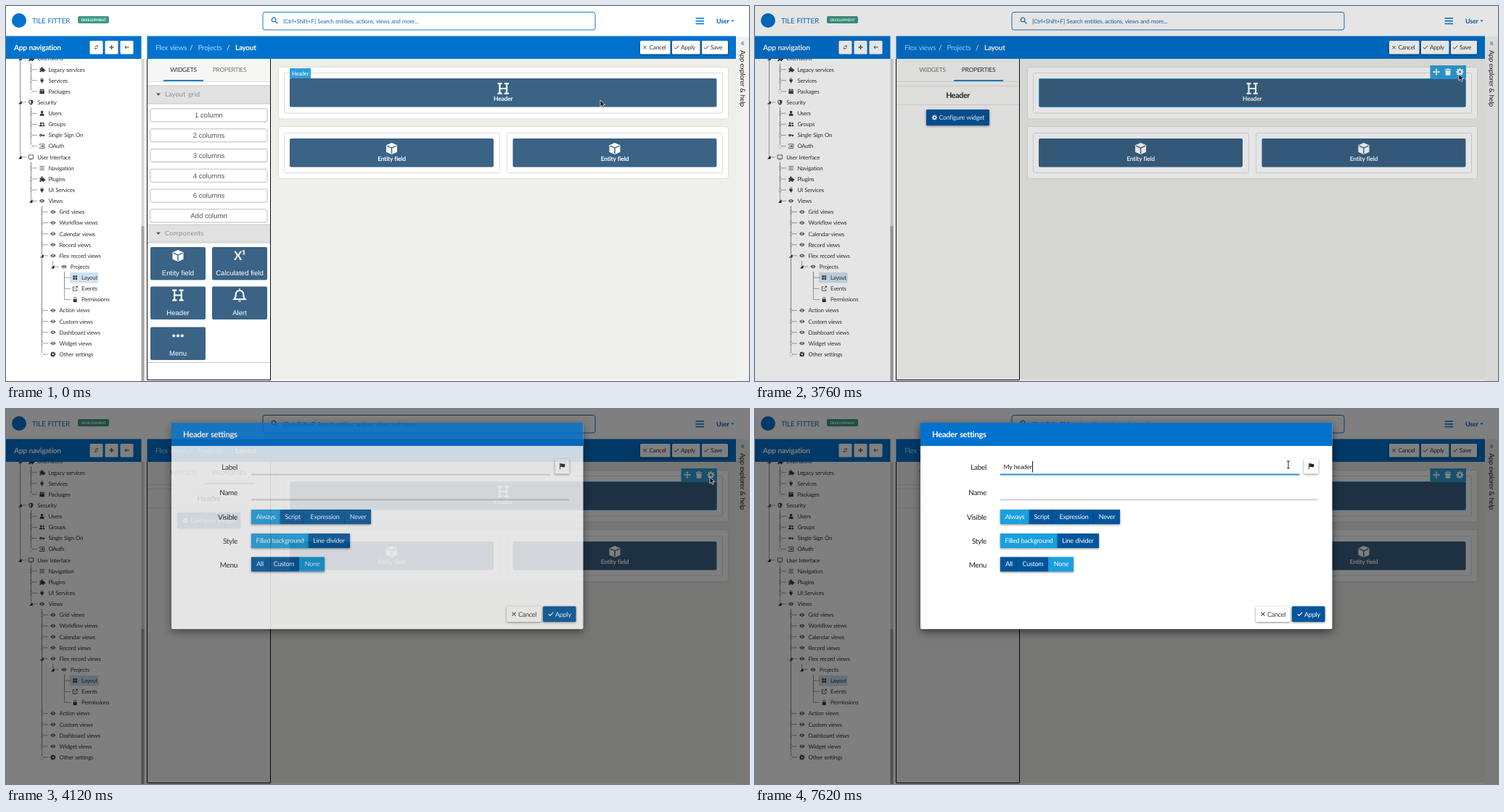
An HTML page that plays this animation: 1024x518 px, repeating every 8000 ms.

```html
<!DOCTYPE html>
<html lang="en">
<head>
<meta charset="utf-8">
<title>Header settings</title>
<style>
html, body { margin: 0; width: 100%; height: 100%; overflow: hidden; background: #fff; }
svg { display: block; width: 100vw; height: 100vh; }
text { font-family: Lato, sans-serif; letter-spacing: -.03em; word-spacing: .07em; white-space: pre; text-rendering: geometricPrecision; }
.b { font-weight: 700; }
.arial { font-family: "Liberation Sans", Arial, sans-serif; letter-spacing: 0; word-spacing: 0; }
.wide { letter-spacing: .3px; }
.mid { text-anchor: middle; }
.end { text-anchor: end; }
.shadow { filter: drop-shadow(0 1px 1.5px #0007); }
</style>
</head>
<body>
<svg id="stage" viewBox="0 0 1024 518"></svg>
<script>
const BLUE = '#0072ce', DEEP = '#00559d', LIGHT = '#1a9fdf', PICK = '#2f9fda', TILE = '#3a6386', INK = '#383838';

// Each icon lives in a 10 x 10 box around its centre: [filled path, stroked path, stroke width].
const ICONS = {
  eye: ['M-5 0Q0-6.5 5 0Q0 6.5-5 0ZM0-2.3A2.3 2.3 0 1 0 .01-2.3ZM0-1A1 1 0 1 1-.01-1Z'],
  puzzle: ['M-4.5-2H-1.5V-3A1.5 1.5 0 1 1 1.2-3V-2H4V0A1.6 1.6 0 1 1 4 2.6V5H1V3.5H-1.3V5H-4.5V2.5H-3V.2H-4.5Z'],
  plug: ['M-3-2H3V0Q3 3 .8 3V5H-.8V3Q-3 3-3 0ZM-2-5H-1V-2H-2ZM1-5H2V-2H1Z'],
  box: ['M-4.5-1H4.5V4.5H-4.5ZM-3.5-4.5H-.5V-1.6H-4.5ZM.5-4.5H3.5L4.5-1.6H.5Z'],
  shield: ['M0-5L4.2-3.4Q4.5 3 0 5ZM0-5L-4.2-3.4Q-4.5 3 0 5V3.6Q-3 2-2.9-2.5L0-3.6Z'],
  user: ['M0-5A2.4 2.6 0 1 1-.01-5ZM-4 5V2.5Q-4 .8-2 .8H2Q4 .8 4 2.5V5Z'],
  users: ['M-2-4A2 2 0 1 1-2.01-4ZM2.6-3.5A1.7 1.7 0 1 1 2.59-3.5ZM-5 4V2.5Q-5 1-3 1H-1Q1 1 1 2.5V4ZM2 4V1H4Q5 1 5 2.5V4Z'],
  key: ['M-2.5-2.4A2.4 2.4 0 1 0-.3 1H2V2.4H4V1H5V-1H-.3A2.4 2.4 0 0 0-2.5-2.4ZM-2.5-.8A.8.8 0 1 1-2.51-.8Z'],
  login: ['M.5-2.5L3 0L.5 2.5V.7H-3V-.7H.5Z', 'M-4.5-2V-4H4.5V4H-4.5V2'],
  screen: ['M-2.5 4H2.5V5H-2.5Z', 'M-4.5-4H4.5V3H-4.5Z'],
  menu: ['', 'M-4.5-3.2H4.5M-4.5 0H4.5M-4.5 3.2H4.5'],
  grid: ['M-4-4H-.5V-.5H-4ZM.5-4H4V-.5H.5ZM-4 .5H-.5V4H-4ZM.5 .5H4V4H.5Z'],
  open: ['M1-5H5V-1Z', 'M-.5-3.5H-4V4H3.5V.5M-1 1L4-4'],
  lock: ['M-3.5-1H3.5V5H-3.5Z', 'M-2-1V-2.5A2 2 0 0 1 2-2.5V-1'],
  gear: ['M-.7-5H.7L1.1-3.6L2.2-3.1L3.5-3.9L4.4-2.8L3.6-1.6L3.9-.7L5.1-.4V1L3.7 1.3L3.2 2.4L3.9 3.6L2.8 4.5L1.6 3.7L.7 4.1L.5 5.2H-.9L-1.2 4L-2.3 3.5L-3.6 4.2L-4.5 3.1L-3.7 1.9L-4 1L-5.2.7V-.7L-3.9-1L-3.4-2.1L-4.1-3.3L-3-4.3L-1.9-3.5L-1-3.8ZM0-1.7A1.7 1.7 0 1 0 .01-1.7Z'],
  move: ['M0-5.3L2-3H-2ZM0 5.3L2 3H-2ZM-5.3 0L-3-2V2ZM5.3 0L3-2V2Z', 'M-4 0H4M0-4V4', 1.5],
  refresh: ['M1.5-5L4.5-3L1.5-1ZM-1.5 5L-4.5 3L-1.5 1Z', 'M-3.5 0Q-3.3-3.2 2-3M3.5 0Q3.3 3.2-2 3'],
  left: ['', 'M5 0H-4M-.8-3.4L-4.2 0L-.8 3.4', 1.5],
  trash: ['M-4.5-4.2H-1.5L-1-5H1L1.5-4.2H4.5V-3H-4.5ZM-3.9-2.2H3.9L3.4 5H-3.4Z'],
  times: ['', 'M-3.4-3.4L3.4 3.4M3.4-3.4L-3.4 3.4', 1.4],
  check: ['', 'M-4.5 0L-1.6 3L4.5-3.4', 1.5],
  search: ['', 'M-1-4.2A3.2 3.2 0 1 1-1.01-4.2ZM1.3 1.3L4.8 4.8', 1.4],
  flag: ['M-4-5H-3V5H-4ZM-2.7-4Q-.5-5 1-3.7Q2.5-3 4.5-4V1Q2 2.2.5 1.2Q-1 .5-2.7 1.3Z'],
  heading: ['', 'M-4.8-4.3H-1M1-4.3H4.8M-4.8 4.3H-1M1 4.3H4.8M-3-4.3V4.3M3-4.3V4.3M-3 0H3', 1.4],
  bell: ['M-1.3 4.1H1.3Q0 6-1.3 4.1Z', 'M-4.2 3Q-2.9 1.8-2.9-.7A2.9 2.9 0 0 1 2.9-.7Q2.9 1.8 4.2 3ZM0-5V-4'],
  dots: ['M-3.6-1.3A1.3 1.3 0 1 1-3.61-1.3ZM0-1.3A1.3 1.3 0 1 1-.01-1.3ZM3.6-1.3A1.3 1.3 0 1 1 3.59-1.3Z'],
  cube: ['M0-5L4.7-3V3L0 5L-4.7 3V-3Z']
};

const rect = (x1, y1, x2, y2, fill, more = '') =>
  `<rect x="${x1}" y="${y1}" width="${x2 - x1}" height="${y2 - y1}" fill="${fill}" ${more}/>`;
const frame = (x1, y1, x2, y2, fill, stroke, r = 2) =>
  rect(x1 + .5, y1 + .5, x2 - .5, y2 - .5, fill, `stroke="${stroke}" rx="${r}"`);
const line = (d, stroke, more = '') => `<path d="${d}" fill="none" stroke="${stroke}" ${more}/>`;
// y is the middle of the capitals
const text = (x, y, size, fill, words, cls = '') =>
  `<text x="${x}" y="${y + size * .36}" font-size="${size}" fill="${fill}" class="${cls}">${words}</text>`;
const icon = (name, x, y, size, color) => {
  const [solid, stroked = '', width = 1.1] = ICONS[name];
  return `<g transform="translate(${x} ${y}) scale(${size / 10})"><path d="${solid}" fill="${color}" fill-rule="evenodd"/>` +
    line(stroked, color, `stroke-width="${width}"`) +
    (name === 'cube' ? line('M-4-2.4L0-.6L4-2.4M0-.6V4.3', TILE, 'stroke-width=".9"') : '') + '</g>';
};
const button = (x1, y1, x2, y2, fill, color, name, label, textX, size) =>
  rect(x1, y1, x2, y2, fill, 'rx="1.5" class="shadow"') + icon(name, textX - 6, (y1 + y2) / 2, size * .8, color) +
  text(textX, (y1 + y2) / 2, size, color, label);

function topBar() {
  return rect(0, 0, 1024, 42, '#fff') + `<circle cx="18" cy="20" r="10" fill="${BLUE}"/>` +
    text(36, 20, 10, '#1173c2', 'TILE FITTER') +
    rect(99, 14, 142, 24, '#3d9b83', 'rx="2"') + text(120.5, 19, 4.8, '#fff', 'DEVELOPMENT', 'b mid') +
    frame(353.5, 8, 812.5, 33.5, '#fff', '#1a7ac8', 3) + icon('search', 370, 20, 9, '#1a6fb5') +
    text(382, 21, 8.1, '#1a6fb5', '[Ctrl+Shift+F] Search entities, actions, views and more...') +
    line('M950.5 17H962M950.5 20.7H962M950.5 24.4H962', BLUE, 'stroke-width="1.5"') +
    text(979, 21, 9, '#0b66b5', 'User', 'b') + `<path d="M999.5 19.5H1003.5L1001.5 21.8Z" fill="#0b66b5"/>`;
}

function sideTree() {
  const rows = `1 Extensions puzzle +|2 Legacy services puzzle|2 Services plug|2 Packages box|1 Security shield +|2 Users user
|2 Groups users|2 Single Sign On key|2 OAuth login|1 User Interface screen +|2 Navigation menu|2 Plugins puzzle|2 UI Services plug
|2 Views eye +|3 Grid views eye|3 Workflow views eye|3 Calendar views eye|3 Record views eye|3 Flex record views eye +|4 Projects eye +
|5 Layout grid|5 Events open|5 Permissions lock|3 Action views eye|3 Custom views eye|3 Dashboard views eye|3 Widget views eye
|3 Other settings gear`.split('|');
  const parentY = [60];
  let out = rect(88, 368, 127.5, 382.5, '#cfe2f0');
  rows.forEach((row, i) => {
    const [, depth, label, name, open] = row.trim().match(/^(\d) (.+?) (\w+)( \+)?$/);
    const level = +depth, y = 72.6 + 15.13 * i, x = 28 + 15.2 * level, stem = Math.round(x - 24.5) + .5;
    parentY[level] = y;
    out += line(`M${stem} ${parentY[level - 1] + 7}V${y}H${stem + 8.5}`, '#8a8a8a', 'stroke-width=".8"');
    if (open) out += `<path d="M${stem - 2.5} ${y + 2.5}H${stem + 2}V${y - 2}Z" fill="#111"/>`;
    else if (level < 4) out += rect(stem - 1.5, y - 2.5, stem + 1.5, y + 2.5, '#fff', 'stroke="#999" stroke-width=".6" stroke-dasharray="1 1"');
    out += icon(name, x - 8.8, y, 7.2, INK) + text(x, y, 7.9, INK, label);
  });
  return `<g clip-path="url(#treeClip)">${out}</g>` + rect(186.5, 73, 190.5, 518, '#d6d6d6') + rect(186.5, 304, 190.5, 518, '#a3a3a3') +
    rect(0, 41.5, 186.5, 73, BLUE) + text(11, 57, 10.2, '#fff', 'App navigation', 'b') +
    ['refresh', 'move', 'left'].map((name, i) =>
      rect(115.5 + 21 * i, 48, 133.5 + 21 * i, 66.5, '#fff', 'rx="1.5"') + icon(name, 124.5 + 21 * i, 57, 6.2, INK)).join('');
}

function widgetsPanel() {
  const section = (y, label) => rect(195, y, 364, y + 25, '#e1e1e1') + line(`M195 ${y}H364M195 ${y + 25}H364`, '#c6c6c6') +
    `<path d="M207 ${y + 10.5}H213L210 ${y + 14}Z" fill="#555"/>` + text(219, y + 12, 9, '#8a8a8a', label, 'wide');
  const tile = (x, y, name, label, iconSize = 16) => rect(x, y, x + 76, y + 45.5, TILE, 'rx="2"') +
    (name ? icon(name, x + 38, y + 12, iconSize, '#fff') : text(x + 38, y + 12, 17, '#fff', 'X¹', 'b mid')) +
    text(x + 38, y + 36, 9.6, '#fff', label, 'arial mid');
  return rect(195, 105, 364, 516, '#fff') + section(110, 'Layout grid') +
    ['1 column', '2 columns', '3 columns', '4 columns', '6 columns', 'Add column'].map((label, i) => {
      const y = 151 + 27.75 * i;
      return frame(198.5, y - 9.5, 360.5, y + 9.5, '#fff', '#bdbdbd') + text(279.5, y, 9.6, '#555', label, 'arial mid');
    }).join('') + section(302, 'Components') +
    tile(199, 333, 'cube', 'Entity field') + tile(284, 333, '', 'Calculated field') +
    tile(199, 387.5, 'heading', 'Header') + tile(284, 387.5, 'bell', 'Alert', 18) +
    tile(199, 443.5, 'dots', 'Menu') + line('M195 492.5H364', '#c6c6c6');
}

const propertiesPanel = () => line('M195 110.5H364M195 136.5H364', '#ddd') +
  text(279.5, 123.5, 10.6, '#222', 'Header', 'b mid') +
  button(236, 143, 323, 165, DEEP, '#fff', 'gear', 'Configure widget', 253.5, 8.8);

function layoutCanvas() {
  const block = (x1, y, x2, name, label) => rect(x1, y, x2, y + 39.5, TILE, 'rx="2"') +
    icon(name, (x1 + x2) / 2, y + 14, 16, '#fff') + text((x1 + x2) / 2, y + 27.5, 8.5, '#fff', label, 'b mid');
  return rect(365, 73, 1006, 516, '#eeeeea') +
    frame(375, 84, 996, 156.5, '#fff', '#deded9', 3) + frame(383, 92, 988, 148.5, '#fff', '#dcdcdc') +
    frame(375, 166, 996, 239, '#fff', '#deded9', 3) + frame(383, 175, 681, 231, '#fff', '#dcdcdc') + frame(690, 175, 988, 231, '#fff', '#dcdcdc') +
    block(391, 100, 979.5, 'heading', 'Header') + block(391, 183, 672, 'cube', 'Entity field') + block(698.5, 183, 979.5, 'cube', 'Entity field') +
    `<g id="tag">${rect(391, 86, 420, 100, PICK) + text(405.5, 93, 7.6, '#fff', 'Header', 'mid')}</g>` +
    `<g id="picked">${frame(391, 100, 980, 140, 'none', PICK) + rect(930.5, 82, 980, 100, PICK) +
      icon('move', 939, 91, 9.5, '#fff') + icon('trash', 955, 91, 9.5, '#fff') + icon('gear', 971.5, 91, 10, '#fff')}</g>`;
}

function mainBar() {
  return rect(194.5, 41.5, 1006, 73, BLUE) +
    text(206, 57.5, 10, '#9fdcff', 'Flex views') + text(253, 57.5, 10, '#fff', '/') +
    text(264.5, 57.5, 10, '#9fdcff', 'Projects') + text(304, 57.5, 10, '#fff', '/') + text(316, 57.5, 10, '#fff', 'Layout', 'b') +
    button(874, 48, 915.5, 66.5, '#fff', INK, 'times', 'Cancel', 886.5, 8.3) + button(918, 48, 956.5, 66.5, '#fff', INK, 'check', 'Apply', 930, 8.3) +
    button(959, 48, 995, 66.5, '#fff', INK, 'check', 'Save', 971, 8.3) +
    rect(1006, 42, 1024, 518, '#f1f1f0') + text(1015, 50, 13, '#2b7fc0', '«', 'mid') +
    `<g transform="translate(1015 61) rotate(90)">${text(0, 0, 9.3, '#222', 'App explorer &amp; help')}</g>`;
}

function dialog() {
  const label = (y, words) => text(319, y, 10, '#222', words, 'end');
  const choices = (y, left, items, active) => items.map(([words, right, textX], i) => {
    const x = i ? items[i - 1][1] : left;
    return rect(x, y - 10, right, y + 10, i === active ? LIGHT : DEEP, 'class="shadow"') + text(textX, y - .5, 9, '#fff', words, 'mid');
  }).join('');
  return rect(228, 19, 795.5, 304, '#fff', 'rx="2" style="filter:drop-shadow(0 4px 6px #0008)"') + rect(228, 19, 795.5, 51, BLUE) +
    text(244, 34.5, 11.3, '#fff', 'Header settings', 'b') +
    label(80, 'Label') + label(115, 'Name') + label(149.5, 'Visible') + label(182.5, 'Style') + label(215.5, 'Menu') +
    rect(338, 89.5, 750.5, 91.5, '#d9d9d9') + rect(338, 124, 776, 126.5, '#d9d9d9') +
    `<rect id="focus" y="89.5" height="2" fill="#3498d4"/>` +
    rect(756.5, 69, 776.5, 89.5, '#fff', 'rx="1.5" class="shadow"') + icon('flag', 766.5, 79, 8.5, '#222') +
    choices(149, 338, [['Always', 378, 358], ['Script', 411, 395], ['Expression', 467, 439.5], ['Never', 503, 485]], 0) +
    choices(182, 338, [['Filled background', 417, 377.5], ['Line divider', 474, 445]], 0) +
    choices(214.5, 338, [['All', 361, 350], ['Custom', 404, 383], ['None', 439, 422]], 2) +
    button(690, 272.5, 738, 294, '#fff', INK, 'times', 'Cancel', 706, 9.1) + button(740, 272.5, 785.5, 294, DEEP, '#fff', 'check', 'Apply', 757, 9.1) +
    `<text id="typed" x="342.5" y="83" font-size="8.7" fill="#222"></text>` +
    `<rect id="caret" y="72" width="1" height="15.5" fill="#111"/>`;
}

const stage = document.getElementById('stage');
stage.innerHTML =
  `<defs><clipPath id="treeClip">${rect(0, 73, 186, 518, '#000')}</clipPath><clipPath id="panelClip">${rect(195, 105, 364, 516, '#000')}</clipPath></defs>` +
  rect(0, 0, 1024, 518, '#fff') + topBar() + sideTree() + layoutCanvas() + mainBar() +
  rect(195, 73, 364, 516, '#f6f6f5') + line('M194.5 73V516.5H364.5V73', '#111') +
  `<g id="tabs">${text(244.5, 88, 8.5, '#333', 'WIDGETS', 'mid') + text(308, 88, 8.5, '#333', 'PROPERTIES', 'mid')}</g>` +
  `<rect id="ink" y="102" height="2" fill="#1583c6"/>` + line('M195 104.5H364', '#dedede') +
  `<g clip-path="url(#panelClip)"><g id="widgets">${widgetsPanel()}</g><g id="properties">${propertiesPanel()}</g></g>` +
  `<rect id="backdrop" width="1024" height="518"/><g id="dialog">${dialog()}</g>` +
  `<path id="arrow" d="M0 0V9L2.1 7.2L3.7 10.4L5.3 9.6L3.8 6.5H6.6Z" fill="#111" stroke="#fff" stroke-width=".7"/>` +
  `<path id="beam" d="M-2-5H-.6Q0-5 0-4.2Q0-5 .6-5H2M0-4.5V4.5M-2 5H-.6Q0 5 0 4.2Q0 5 .6 5H2" fill="none" stroke="#222"/>`;

const el = Object.fromEntries([...stage.querySelectorAll('[id]')].map(node => [node.id, node]));
const set = (node, attrs) => { for (const key in attrs) node.setAttribute(key, attrs[key]); };
const show = (node, on) => set(node, { visibility: on ? 'visible' : 'hidden' });
const ramp = (t, from, to) => Math.min(1, Math.max(0, (t - from) / (to - from)));
const smooth = p => p * p * (3 - 2 * p);
const mix = (a, b, p) => a + (b - a) * p;

// Pointer stops: time, x, y, ease-out power of the leg that ends there.
const STOPS = [[2000, 819, 130, 1], [2260, 926, 115.5, 1], [2800, 970, 94, 3], [4780, 970, 94, 1], [5200, 741, 79, 2], [5340, 741, 79, 1], [5520, 735, 77, 2]];
function pointer(t) {
  let [, x, y] = STOPS[0];
  for (let i = 1; i < STOPS.length; i++) {
    const [end, toX, toY, power] = STOPS[i];
    const p = 1 - (1 - ramp(t, STOPS[i - 1][0], end)) ** power;
    x = mix(x, toX, p);
    y = mix(y, toY, p);
  }
  return [x, y];
}

const SELECT = 740, FOCUS = 5640, PHRASE = 'My header';
const KEYS = [6460, 6580, 6740, 6960, 7070, 7180, 7320, 7480, 7620];

function draw(t) {
  const [x, y] = pointer(t), inField = t > 4780 && x < 751;
  for (const node of [el.arrow, el.beam]) set(node, { transform: `translate(${x} ${y})` });
  show(el.arrow, !inField);
  show(el.beam, inField);

  const slide = smooth(ramp(t, SELECT, 1160));
  set(el.widgets, { transform: `translate(${-170 * slide} 0)` });
  set(el.properties, { transform: `translate(${170 * (1 - slide)} 0)` });
  set(el.ink, { x: mix(217, 274, slide), width: mix(55, 68, slide) });
  const [first, second] = el.tabs.children;
  set(first, { opacity: mix(1, .65, slide) });
  set(second, { opacity: mix(.65, 1, slide) });
  show(el.picked, t >= SELECT);
  show(el.tag, t < 2800 && y >= 100);

  set(el.backdrop, { opacity: .5 * ramp(t, 3735, 3865) });
  set(el.dialog, { opacity: ramp(t, 3960, 4160) });

  const grow = smooth(ramp(t, FOCUS, 5800)), count = KEYS.filter(key => t >= key).length;
  set(el.focus, { x: 544.25 - 206.25 * grow, width: 412.5 * grow });
  el.typed.textContent = PHRASE.slice(0, count);
  set(el.caret, {
    x: count ? 343 + el.typed.getComputedTextLength() : 343,
    opacity: (t >= FOCUS && t < 6160) || t >= KEYS[0] ? 1 : 0
  });
}

const start = performance.now();
function tick() {
  draw((performance.now() - start) % 8000);
  requestAnimationFrame(tick);
}
tick();
</script>
</body>
</html>
```
